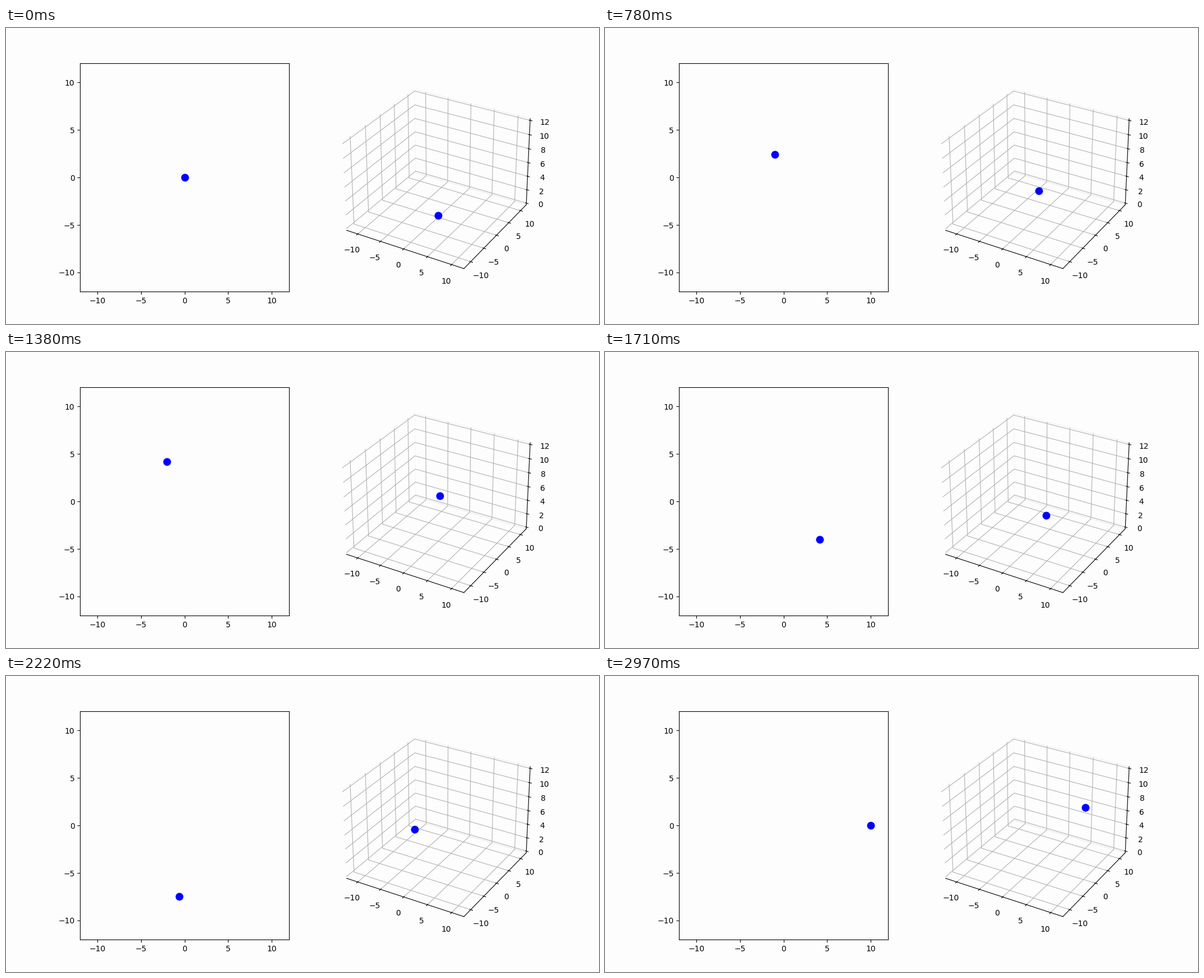
Animation of 1058 by 529 pixels, one loop 3000 ms. Source, as a matplotlib script:

```python
import numpy as np
import matplotlib.pyplot as plt
from matplotlib.animation import FuncAnimation

FRAMES, INTERVAL = 100, 30
PAPER = "#fdfdfd"
TICKS = range(-10, 11, 5)

# Spiral: the radius grows to 10 over five turns, the height follows the radius.
t = np.linspace(0, 10, FRAMES)
xs, ys, zs = t * np.cos(np.pi * t), t * np.sin(np.pi * t), t

fig = plt.figure(figsize=(10.58, 5.29), dpi=100, facecolor=PAPER)

flat = fig.add_subplot(1, 2, 1, facecolor=PAPER)
flat.set(xlim=(-12, 12), ylim=(-12, 12), xticks=TICKS, yticks=TICKS)

# The box reaches 1/48 of the range past the data limits on each side.
space = fig.add_subplot(1, 2, 2, projection="3d", facecolor=PAPER)
space.set(xlim=(-12.5, 12.5), ylim=(-12.5, 12.5), zlim=(-0.25, 12.25),
          xticks=TICKS, yticks=TICKS, zticks=range(0, 13, 2))
for axis in (space.xaxis, space.yaxis, space.zaxis):
    axis.pane.fill = False

style = dict(marker="o", color="blue", markersize=9, linestyle="none")
dot2d, = flat.plot(xs[:1], ys[:1], **style)
dot3d, = space.plot(xs[:1], ys[:1], zs[:1], **style)


def update(i):
    point = slice(i, i + 1)
    dot2d.set_data(xs[point], ys[point])
    dot3d.set_data_3d(xs[point], ys[point], zs[point])
    return dot2d, dot3d


anim = FuncAnimation(fig, update, frames=FRAMES, interval=INTERVAL,
                     repeat=True, repeat_delay=0)
plt.show()
```
